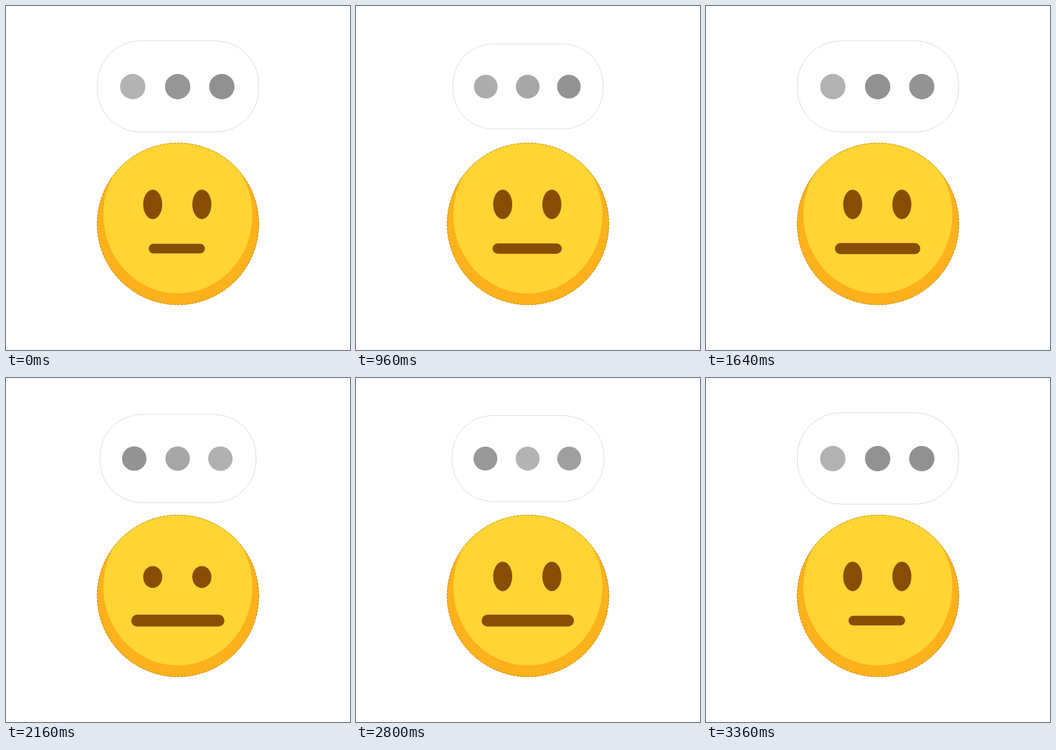
Write an HTML page with a canvas that moves like this. It is 480 px wide and 480 px high and loops after 3.4 s.

```html
<!DOCTYPE html>
<html lang="en">
<head>
<meta charset="utf-8">
<title>Thinking face</title>
<style>
  html, body { margin: 0; width: 100%; height: 100%; overflow: hidden; background: #fff; }
  canvas { display: block; width: 480px; height: 480px; }
</style>
</head>
<body>
<canvas id="stage" width="480" height="480"></canvas>
<script>
const ctx = document.getElementById('stage').getContext('2d');
const LOOP = 3400, STEP = 40, PULSE = 1700, WAVE = 850;
const BROWN = '#884d04', DARK = 144, LIGHT = 179;

// Sine ease from 0 to 1 between two times
function ease(t, from, to) {
  const p = Math.min(1, Math.max(0, (t - from) / (to - from)));
  return (1 - Math.cos(Math.PI * p)) / 2;
}

// Lopsided sine wave: 1 at time top, 0 at time low, repeating every WAVE
function wave(t, top, low) {
  const wrap = v => (v % WAVE + WAVE) % WAVE;
  const fall = wrap(low - top), since = wrap(t - top);
  return since < fall ? 1 - ease(since, 0, fall) : ease(since, fall, WAVE);
}

function oval(x, y, rx, ry, fill) {
  ctx.beginPath();
  ctx.ellipse(x, y, rx, ry, 0, 0, Math.PI * 2);
  ctx.fillStyle = fill;
  ctx.fill();
}

function pill(x, y, w, h, r, fill) {
  ctx.beginPath();
  ctx.roundRect(x - w / 2, y - h / 2, w, h, r);
  ctx.fillStyle = fill;
  ctx.fill();
}

function drawDot(t, x, top, low) {
  const v = Math.round(DARK + (LIGHT - DARK) * wave(t, top, low));
  oval(x, 0.2, 17.7, 17.7, `rgb(${v},${v},${v})`);
}

function drawBubble(t) {
  const scale = (218.2 + 7.8 * Math.cos(2 * Math.PI * (t - 40) / PULSE)) / 226;
  ctx.save();
  ctx.translate(240, 112.3);
  ctx.scale(scale, scale);
  pill(0, 0, 225.7, 127.6, 61, '#fff');
  ctx.strokeStyle = '#c8c8c8';
  ctx.lineWidth = 0.6;
  ctx.stroke();
  drawDot(t, -63.2, 0, 370);
  drawDot(t, -0.5, 235, 765);
  drawDot(t, 61.2, 540, 0);
  ctx.restore();
}

function drawFace(t) {
  ctx.save();
  oval(240, 304, 113.1, 113.1, '#fdb11c');
  ctx.clip();
  oval(239.8, 291.4, 104, 109.6, '#ffd433');
  ctx.restore();

  // Rough dark rim
  ctx.save();
  ctx.beginPath();
  ctx.arc(240, 304, 112.8, 0, Math.PI * 2);
  ctx.setLineDash([3, 2]);
  ctx.lineWidth = 0.7;
  ctx.strokeStyle = 'rgba(70, 45, 0, 0.5)';
  ctx.stroke();
  ctx.restore();

  const shut = ease(t, 2120, 2230) - ease(t, 2230, 2340);
  for (const side of [-1, 1]) {
    oval(239 + 34.3 * side, 276.8 + 3 * shut, 13.3, 20.6 * (1 - 0.88 * shut), BROWN);
  }

  const wide = ease(t, 0, 2420) - ease(t, 2700, LOOP);
  const h = 13.5 + 2.9 * wide;
  pill(238.3 + 1.5 * wide, 338.5, 78.5 + 53 * wide, h, h / 2, BROWN);
}

function frame() {
  const t = Math.floor(performance.now() % LOOP / STEP) * STEP;
  ctx.fillStyle = '#fff';
  ctx.fillRect(0, 0, 480, 480);
  drawBubble(t);
  drawFace(t);
  requestAnimationFrame(frame);
}
frame();
</script>
</body>
</html>
```
